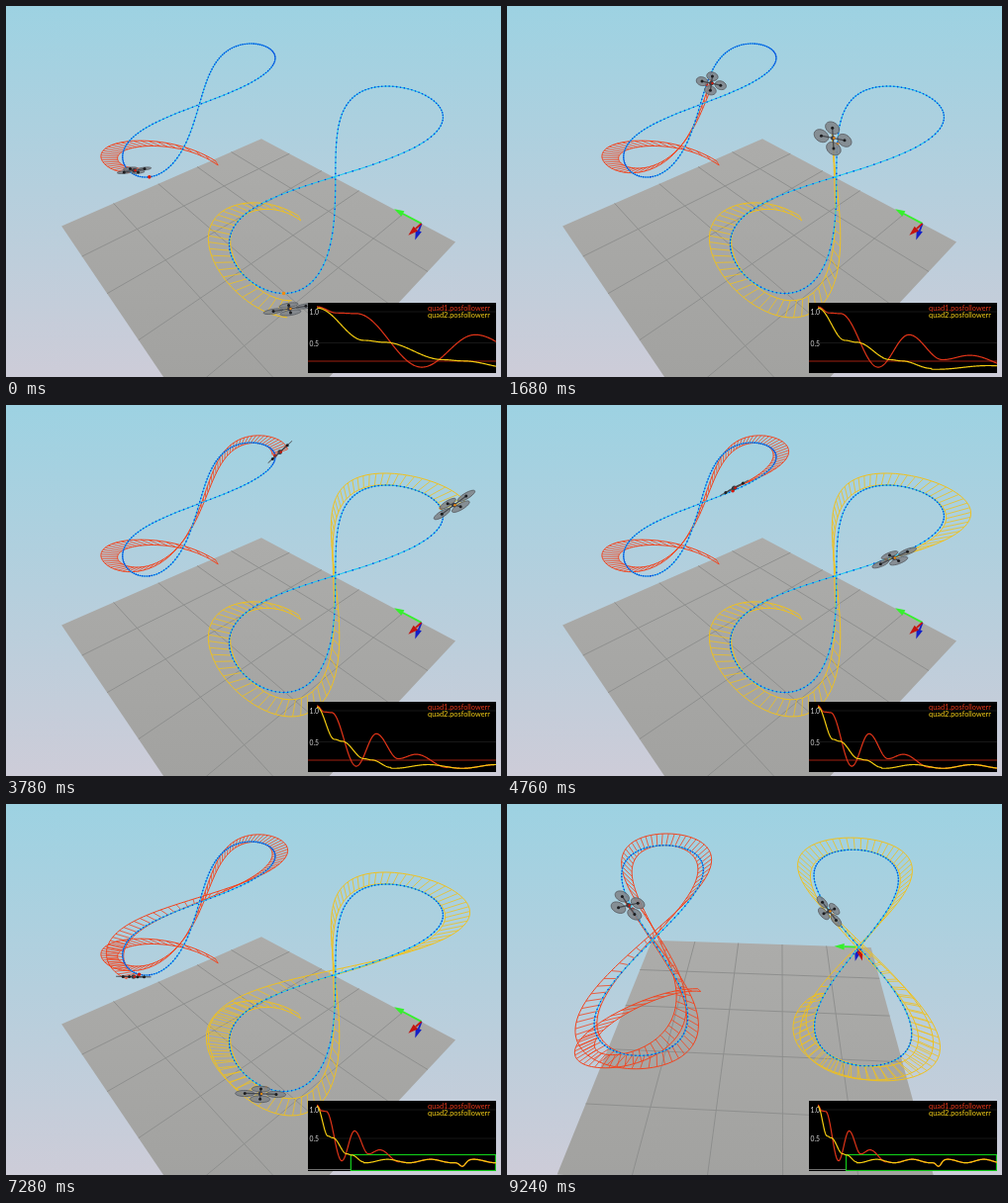
An HTML page with a canvas that plays this animation: 500x375 px, repeating every 9.31 s.

```html
<!DOCTYPE html>
<html lang="en">
<head>
<meta charset="utf-8">
<title>Quadrotor path following</title>
<style>
html, body { margin: 0; width: 100%; height: 100%; overflow: hidden; background: #b5d0dd; }
canvas { display: block; width: 100%; height: 100%; }
</style>
</head>
<body>
<canvas id="stage" width="500" height="375"></canvas>
<script>
const ctx = document.getElementById('stage').getContext('2d');
const LOOP = 9310, STEP = 70, LAP = 7500, LEAD = 2270;
const ORBIT_START = 8750, ORBIT_END = 9240;
const FOCAL = 358, DISTANCE = 6.4, FLOOR = 2.5, TILES = 5;
const { sin, cos, exp, PI } = Math;

// x is the centre of the lap, drift the sideways error at take-off (metres)
const quads = [
  { x: -1.45, drift: .72, color: '#f2431d', dot: '#d81808' },
  { x: 1.45, drift: -.25, color: '#efc11f', dot: '#f08a10' }
];

const lerp = (a, b, k) => a + (b - a) * k;
const ease = k => (1 - cos(PI * Math.min(1, Math.max(0, k)))) / 2;
const add = (p, q, k = 1) => p.map((v, i) => v + q[i] * k);
const dot = (p, q) => p.reduce((sum, v, i) => sum + v * q[i], 0);
const unit = p => p.map(v => v / Math.hypot(...p));
const cross = ([a, b, c], [d, e, f]) => [b * f - c * e, c * d - a * f, a * e - b * d];

// Camera circling the floor centre; returns a projection to the stage.
function camera(k) {
  const rad = PI / 180;
  const yaw = lerp(48.3, 3, k) * rad;
  const elevation = lerp(43.8, 53, k) * rad;
  const pitch = elevation - 6.8 * rad;
  return ([x, y, z]) => {
    const right = x * cos(yaw) + y * sin(yaw);
    const ahead = y * cos(yaw) - x * sin(yaw) + DISTANCE * cos(elevation);
    const below = DISTANCE * sin(elevation) - z;
    const depth = ahead * cos(pitch) + below * sin(pitch);
    return [
      250 + FOCAL * right / depth,
      187.5 + FOCAL * (below * cos(pitch) - ahead * sin(pitch)) / depth
    ];
  };
}

const phase = t => 2 * PI * (t - 3250) / LAP;

// Figure eight on a plane that rises away from the viewer.
function lapPoint(quad, t) {
  const a = phase(t);
  return [quad.x + .62 * sin(2 * a), .05 + 1.45 * cos(a), 1.97 + .72 * cos(a)];
}

// The real flight: climbs from below and swings sideways until it settles.
function flownPoint(quad, t) {
  const age = t + LEAD;
  const swing = cos(PI * age / 2200) * exp(-age / 3000);
  return add(lapPoint(quad, t), [quad.drift * swing, 0, -.82 * exp(-age / 400)]);
}

const ribAt = t => [.19 * sin(2 * phase(t)), .24 * cos(phase(t)), .08];

function stroke(points, color, width = 1) {
  ctx.beginPath();
  points.forEach(p => ctx.lineTo(...p));
  ctx.strokeStyle = color;
  ctx.lineWidth = width;
  ctx.stroke();
}

function fill(points, color) {
  ctx.beginPath();
  points.forEach(p => ctx.lineTo(...p));
  ctx.fillStyle = color;
  ctx.fill();
}

function disc([x, y], r, color) {
  ctx.beginPath();
  ctx.arc(x, y, r, 0, 2 * PI);
  ctx.fillStyle = color;
  ctx.fill();
}

function gradient(y0, y1, from, to) {
  const g = ctx.createLinearGradient(0, y0, 0, y1);
  g.addColorStop(0, from);
  g.addColorStop(1, to);
  return g;
}

function drawFloor(project) {
  const at = (x, y) => project([x, y, 0]);
  fill([at(-FLOOR, FLOOR), at(FLOOR, FLOOR), at(FLOOR, -FLOOR), at(-FLOOR, -FLOOR)],
    gradient(136, 375, '#acacaa', '#a2a2a0'));
  for (let i = 1; i < TILES; i++) {
    const s = lerp(-FLOOR, FLOOR, i / TILES);
    stroke([at(s, -FLOOR), at(s, FLOOR)], '#8c8d8c', .9);
    stroke([at(-FLOOR, s), at(FLOOR, s)], '#8c8d8c', .9);
  }
}

function drawArrow(from, to, color) {
  const [ux, uy] = unit(add(to, from, -1));
  const base = [to[0] - ux * 10, to[1] - uy * 10];
  stroke([from, base], color, 1.8);
  fill([to, add(base, [-uy, ux], 3.2), add(base, [uy, -ux], 3.2)], color);
}

function drawAxes(project) {
  const origin = [2.04, 1.9, .48];
  const arrow = (offset, color) =>
    drawArrow(project(origin), project(add(origin, offset)), color);
  arrow([-.5, 0, 0], '#35f02c');
  arrow([0, 0, -.38], '#1420c8');
  arrow([0, -.42, 0], '#c41410');
}

function drawRibbon(quad, t, project) {
  const inner = [], outer = [];
  for (let s = -LEAD; s < t + 40; s += 40) {
    const at = Math.min(s, t), p = flownPoint(quad, at);
    inner.push(project(p));
    outer.push(project(add(p, ribAt(at))));
  }
  for (let i = 0; i < inner.length; i += 2) stroke([inner[i], outer[i]], quad.color, .8);
  stroke(inner, quad.color);
  stroke(outer, quad.color);
}

function drawLap(quad, project) {
  const points = [];
  for (let s = 0; s <= LAP; s += 50) points.push(project(lapPoint(quad, s)));
  stroke(points, '#22c8f0', 1.1);
  points.forEach(p => disc(p, .8, '#0a40dc'));
}

function drawDrone(quad, t, project) {
  const a = phase(t);
  const centre = add(flownPoint(quad, t), ribAt(t), .5);
  const up = unit([-1.15 * sin(2 * a), -.5 * cos(a), 1]);
  const diagonal = [1, 1, 0];
  const armA = unit(add(diagonal, up, -dot(diagonal, up)));
  const armB = cross(up, armA);
  const middle = project(centre);
  const rotors = [[armA, 1], [armB, 1], [armA, -1], [armB, -1]]
    .map(([arm, sign]) => add(centre, arm, .165 * sign));
  for (const rotor of rotors) {
    const rim = Array.from({ length: 25 }, (_, i) => {
      const turn = i / 12 * PI;
      return project(add(add(rotor, armA, .1 * cos(turn)), armB, .1 * sin(turn)));
    });
    fill(rim, 'rgba(128,132,138,.88)');
    stroke(rim, '#5c6066', .9);
  }
  for (const hub of rotors.map(project)) {
    stroke([middle, hub], '#44474c', 1.2);
    disc(hub, 1.5, '#1c1d20');
  }
  disc(middle, 2.3, '#3a3c44');
  disc(add(middle, [1, 0]), 1.2, quad.dot);
}

// Tracking error: eased between turning points, then a slow ripple with one dip.
const errorKeys = [
  [[0, 1.08], [250, .98], [500, .97], [1330, .11], [2007, .63], [2750, .23], [3350, .3], [4400, .09]],
  [[0, 1.06], [600, .54], [850, .51], [1600, .23], [1850, .21], [2500, .09]]
];

function errorAt(keys, age) {
  const n = keys.findIndex(([s]) => s > age);
  if (n > 0) {
    const [s0, e0] = keys[n - 1], [s1, e1] = keys[n];
    return lerp(e0, e1, ease((age - s0) / (s1 - s0)));
  }
  const ripple = .105 + .03 * cos(2 * PI * (age - 6060) / 2300);
  return ripple - .09 * exp(-(((age - 7770) / 220) ** 2));
}

function drawText(text, x, y, color, align, size) {
  ctx.font = `${size}px Lato, "Open Sans", sans-serif`;
  ctx.textAlign = align;
  ctx.fillStyle = color;
  ctx.fillText(text, x, y);
}

function drawPlot(t) {
  const left = 314, right = 495, top = 300, bottom = 371, span = t + LEAD;
  const settled = t >= 5390;
  const [zero, scale] = settled ? [367, 58] : [372, 63];
  const py = e => zero - e * scale;
  ctx.save();
  ctx.beginPath();
  ctx.rect(305, top, right - 305, bottom - top);
  ctx.clip();
  ctx.fillStyle = '#000';
  ctx.fillRect(305, top, right - 305, bottom - top);
  for (const e of [1, .5]) {
    stroke([[left, py(e)], [right, py(e)]], '#1d1d1d', .8);
    drawText(e.toFixed(1), 306.5, py(e) + 3, '#d8d8d8', 'left', 6.8);
  }
  if (settled) {
    const x = lerp(left, right, 1815 / span);
    stroke([[305, 369.5], [x, 369.5], [x, 354]], '#8a8a8a', .8);
    ctx.strokeStyle = '#10c818';
    ctx.lineWidth = 1.2;
    ctx.strokeRect(x, 354.5, right - .5 - x, 16);
  } else {
    stroke([[305, 359], [right, 359]], '#a02010');
  }
  errorKeys.forEach((keys, n) => {
    const points = [];
    for (let x = left; x <= right; x += .5) {
      points.push([x, py(errorAt(keys, (x - left) / (right - left) * span))]);
    }
    stroke(points, ['#e03418', '#f4cc10'][n], 1.2);
  });
  drawText('quad1.posfollowerr', 489, 308, '#e83a1c', 'right', 7.4);
  drawText('quad2.posfollowerr', 489, 315, '#f6d018', 'right', 7.4);
  ctx.restore();
}

function draw(t) {
  const project = camera(ease((t - ORBIT_START) / (ORBIT_END - ORBIT_START)));
  ctx.fillStyle = gradient(0, 375, '#9dd2e2', '#cdccd8');
  ctx.fillRect(0, 0, 500, 375);
  drawFloor(project);
  drawAxes(project);
  for (const quad of quads) {
    drawRibbon(quad, t, project);
    drawLap(quad, project);
    disc(project(lapPoint(quad, t)), 1.8, quad.dot);
    drawDrone(quad, t, project);
  }
  drawPlot(t);
}

const start = performance.now();
function tick() {
  const t = (performance.now() - start) % LOOP;
  draw(Math.floor(t / STEP) * STEP);
  requestAnimationFrame(tick);
}
tick();
</script>
</body>
</html>
```
